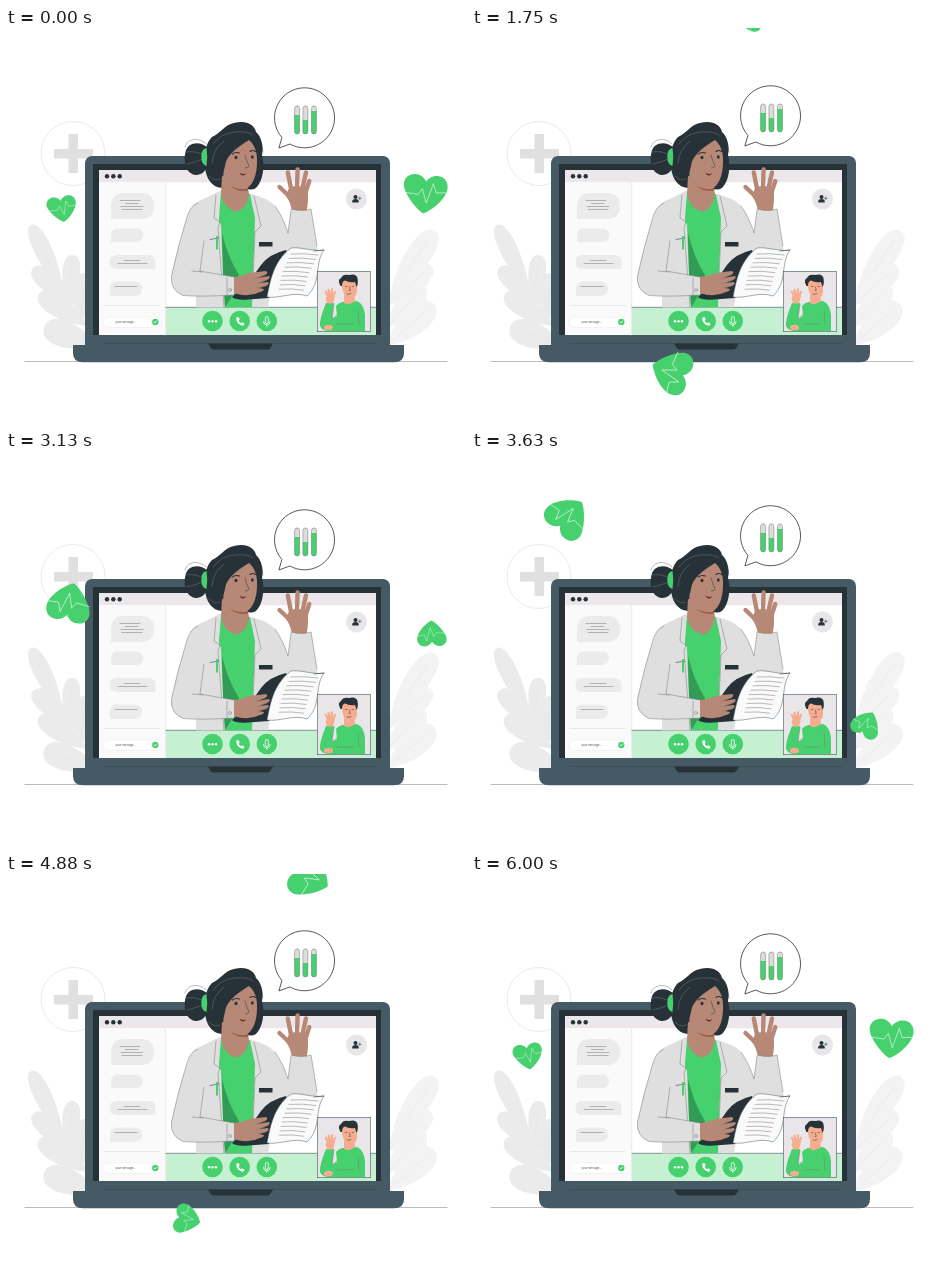
These frames come from a looping animation (460 by 395 pixels, 6040 ms). An HTML page:

```html
<!DOCTYPE html>
<html lang="en">
<head>
<meta charset="utf-8">
<title>Online doctor</title>
<style>
html, body { margin: 0; width: 100%; height: 100%; overflow: hidden; background: #fff; }
svg { display: block; width: 100vw; height: 100vh; }
#hearts { transform-origin: 240.9px 170px; }
.green { fill: #47d06e; }
.slate { fill: #455a64; }
.dark { fill: #263238; }
.soft { fill: #ebebeb; }
.coat { fill: #dfdfdf; }
.skin { fill: #b78876; }
.peach { fill: #f6ad8f; }
.white { fill: #fff; }
.line { fill: none; stroke: #37474f; stroke-width: .6; stroke-linecap: round; stroke-linejoin: round; }
.thin { stroke: #777; stroke-width: .5; }
.pale { stroke: #dcdcdc; }
.ink { stroke: #fff; stroke-width: .8; }
.bold { stroke: #263238; stroke-width: 1.1; }
.finger { fill: none; stroke: #b78876; stroke-width: 4.4; stroke-linecap: round; }
.small { fill: none; stroke: #f6ad8f; stroke-width: 2.3; stroke-linecap: round; }
</style>
</head>
<body>
<svg viewBox="0 0 460 395" preserveAspectRatio="none">
  <defs>
    <g id="heart">
      <path class="green" d="M0 19.500C-8 16-22-.5 -22-8C-22-15-17-19-11-19C-6-19-2-16 0-12.500C2-16 6-19 11-19C17-19 22-15 22-8C22 3 8 16 0 19.500Z"/>
      <path class="line ink" style="stroke-width:.55" d="M-20 0L-7 1L-3-5L2 9L7.500-11L11-2L21-3"/>
    </g>
  </defs>

  <path class="line thin" d="M19 333.500H441"/>
  <g id="plants"></g>

  <circle cx="67" cy="125.500" r="32" fill="#fff" stroke="#e0e0e0" stroke-width=".7"/>
  <path fill="#e0e0e0" d="M62.500 106h9.500v15h15v9.500h-15v14.500h-9.500v-14.500h-14.500v-9.500h14.500z"/>

  <!-- laptop -->
  <rect class="slate" x="79" y="128" width="305" height="195" rx="7"/>
  <path class="dark" d="M87 136H375V307H87Z"/>
  <path class="white" d="M93 142H370V307H93Z"/>
  <path fill="#ebe7ea" d="M93 142H370V154.300H93Z"/>
  <g class="dark"><circle cx="101" cy="148.200" r="2.200"/><circle cx="107.300" cy="148.200" r="2.200"/><circle cx="113.700" cy="148.200" r="2.200"/></g>
  <path class="slate" d="M67 317H398V325Q398 334.300 388 334.300H77Q67 334.300 67 325Z"/>
  <path class="line" d="M98 315.500H370"/>
  <path class="dark" d="M202 315.500H267L264 320.500Q263 321.500 261 321.500H208Q206 321.500 205 320.500Z"/>

  <!-- chat -->
  <path fill="#fafafa" d="M93 154.300H160V307H93Z"/>
  <path class="line pale" d="M159.700 155V307M98 277.500H153"/>
  <g class="soft">
    <path d="M105 191V177.500Q106 165 118 165H135Q148 165.500 148 178T135 191Z"/>
    <path d="M105 214V207Q105 200.500 112 200.500H130Q137 201 137 207.300T130 214Z"/>
    <path d="M149.500 241V234Q149.500 227 142 227H111Q103.500 227 103.500 234T111 241Z"/>
    <path d="M104 268V260Q104 253.500 111 253.500H128Q136 253.500 136 260.500T128 268Z"/>
  </g>
  <path class="line thin" d="M114 172.500H134M119.500 175.500H132M115 178.500H137M116 181.500H136M118 232.500H134M112 235.500H141M109 258.500H131"/>
  <rect x="97.500" y="289" width="57" height="10.500" rx="5" fill="#fff" stroke="#ececec" stroke-width=".6"/>
  <text x="109.500" y="295.200" font-family="Lato, sans-serif" font-size="3.200" font-style="italic" fill="#455a64">your message...</text>
  <circle class="green" cx="149.300" cy="294" r="3.200"/>
  <path class="line ink" d="M148 294l1 1l1.600-2"/>

  <!-- call bar -->
  <path fill="#c5f0d2" d="M160 279.500H370V307H160Z"/>
  <path class="line" d="M160 279.300H370"/>
  <g class="green"><circle cx="206.500" cy="293" r="10.300"/><circle cx="233.700" cy="293" r="10.300"/><circle cx="260.800" cy="293" r="10.300"/></g>
  <g class="white"><circle cx="203" cy="293.200" r="1.200"/><circle cx="206.500" cy="293.200" r="1.200"/><circle cx="210" cy="293.200" r="1.200"/></g>
  <path class="white" d="M230.500 289.500L232.500 289L233.700 291.500L232.600 292.700Q233.500 294.500 235 295.200L236.500 294.200L238.500 296L237.300 297.800Q235.500 298 233 296Q229.500 293 230.500 289.500Z"/>
  <path class="line ink" d="M259.300 290a1.500 1.500 0 0 1 3 0v4a1.500 1.500 0 0 1-3 0zM257.500 293.500q0 3.500 3.300 3.500t3.300-3.500M260.800 297v1.500"/>
  <circle cx="350.500" cy="171" r="10.500" fill="#e8e6e9"/>
  <g class="dark"><circle cx="349.500" cy="169" r="2"/><path d="M346.200 174.500V173Q346.500 171 349.500 171T352.700 173V174.500Z"/></g>
  <path class="line" d="M352.500 170.300h2.600m-1.300-1.300v2.600"/>

  <!-- doctor: raised arm and coat -->
  <path class="finger" d="M284 169L273.500 159M285.500 163L281.800 144.500M291 160L291.600 141.500M296 162L300 144.500M299 166L303.300 153"/>
  <path class="skin" d="M283 160Q292 155 301.500 162Q303 171 300.500 184H286Q285 175 280 168Z"/>
  <path class="coat" d="M190 176Q197 171 214 163L245 166Q262 170 269 178Q277 189 282 205L285 181Q296 184 305 181L312 225Q310 240 297 240L272 225L262 279.300H190Z"/>
  <path class="green" d="M215 164L213 190L219 279.300H246L249 190L244 166Z"/>
  <path fill="#329b56" d="M216 205Q222 230 233 247L225 270L219 279L217 245Z"/>
  <path class="coat" d="M214 163L208 169L210 191L215 196L218 279.300H190V176Z"/>
  <path class="coat" d="M244 165L252 174L256 198L249 204L246 262L265 255L268 180Z"/>
  <path class="line thin" d="M210 167L208 190L214 194L212 200L218 279M248 168L255 198L249 204L247 250M269 178Q277 189 282 205L285 182M285 181Q296 184 305 181L311 218M190 193L191 225"/>
  <path class="coat" d="M200 170Q187 174 183 184Q173 212 165.500 248Q164 262 177 267.500Q194 269 228 267V249L194 243L199 210Z"/>
  <path class="line thin" d="M192 175Q184 178 181 189Q172 218 165.500 248Q164 262 177 267.500Q194 269 228 267M194 243L228 249M194 243L198 213M186 243L197 244M221 250V267"/>
  <circle class="line thin" cx="224" cy="262" r="1.500"/>
  <path class="line" d="M204 211.500L213 210"/>
  <path class="green" d="M210 208h2v13l-1 1l-1-1z"/>
  <path class="dark" d="M253 214H266.500V218.500H253Z"/>

  <!-- head -->
  <path class="dark" d="M201 119C193 112 181 115 179.500 124C177 134 180 146 190 147C196 147 199 143 202 138Z"/>
  <path class="line thin" d="M180 124Q190 122 199 128M181 136Q190 134 199 130M179 119C181 110 194 109 200 116M249 110Q256 113 257 124"/>
  <path class="dark" d="M203 152C197 142 196 119 206 109C214 106 218 97 228 95C240 91.500 249 97 250 104C255 108 258 118 256 127C259 138 257 153 250 160Q245 163 239 160L216 160Q207 159 203 152Z"/>
  <path class="green" d="M200.500 120Q202 129 200.500 138Q195.500 137 195.300 129T200.500 120Z"/>
  <path class="skin" d="M216 148L215 165Q217 180 230 183.500Q241 181 243 166L241 154Z"/>
  <path fill="#9c5a43" d="M220 153Q229 162 242 159V162.500Q228 165 220 153Z"/>
  <path class="skin" d="M243 112C249 117 251.500 125 251 134C251 147 247 157 240 161C231 162 221 158 217 151Q217 144 219 138C220 128 230 120 243 112Z"/>
  <path class="line thin" d="M207 116Q215 105 229 104T247 107M206 135Q207 121 218 113M203 148Q209 154 214 151"/>
  <path class="line bold" d="M226.500 126Q229 123.500 233.500 125M244 123.500Q246.500 121.500 249.500 123.500"/>
  <path class="line" d="M239 127Q240.500 133 243 138Q242.500 140 239.500 140"/>
  <ellipse class="dark" cx="230" cy="129.500" rx="1.500" ry="1.700"/><ellipse class="dark" cx="246.300" cy="129" rx="1.400" ry="1.700"/>
  <path fill="#6d3226" d="M233.500 144.500Q237 147 240.500 145Q238.500 148 236.500 147.500T233.500 144.500Z"/>

  <!-- clipboard -->
  <path class="dark" d="M280 222Q263 226 255 237Q244 254 226 269Q230 272.500 242 271.500L263 270Q271 245 282 227Z"/>
  <path d="M285 220C295 218.500 307 224 318 222C308 236 316 254 301 268C288 263 273 271 261 269C264 256 266 234 285 220Z" fill="#fafafa" stroke="#455a64" stroke-width=".5"/>
  <path class="line" d="M308 223L318 222"/>
  <path id="notes" class="line thin"/>
  <path class="skin" d="M228 249Q237 248 243 245L260 243Q263 245 259 247L251 250L263 248Q265 250 261 252L253 255L262 254Q264 256 260 258L253 260L258 261Q258 263 254 264Q242 270 228 265Z"/>
  <path class="line thin" d="M249 251L259 247M251 256L261 252M251 260L260 258"/>

  <g id="hearts">
    <use href="#heart" transform="translate(56 181) rotate(-9) scale(.67)"/>
    <use href="#heart" transform="translate(419 166) rotate(5)"/>
  </g>

  <!-- patient -->
  <rect x="311.300" y="243.300" width="53" height="60.400" fill="#e8e6e9" stroke="#455a64" stroke-width=".6"/>
  <path class="green" d="M330 278Q335 273 341 274L351 273Q358 276 359 287V303H327Q316 304 314 298Q313 292 320 275L328 275L326 291L331 288Z"/>
  <path class="peach" d="M338 264L338 275Q343 278 349 273L348 264Z"/>
  <path class="peach" d="M336 253Q343 249 351 252V264Q350 270 344.500 270Q337 269 336 259Z"/>
  <path class="dark" d="M334.500 258Q331 252 335 250Q337 245.500 343 247Q350 245 351.500 250Q352.500 256 350.500 259L349 254Q343 255 339 252.500Q336 253 336 258Z"/>
  <path class="line" d="M339.500 258.500h1.500M346 258.500h1.500M343.500 259l.7 3.500h-1M341 266q2 1 4-.5"/>
  <path class="small" d="M322 268L319.800 264M323.500 267L322.500 262M325.500 267L326 261.500M327 268L329 264"/>
  <path class="peach" d="M321 267Q325 264 329 268L327 275.500H321.500L319.500 271Z"/>
  <ellipse class="peach" cx="322.500" cy="299.500" rx="4.500" ry="2.700"/>
  <path class="line thin" d="M328 276L326 291L331 287M331 296H348M352 283L353 296"/>

  <!-- speech bubble -->
  <g id="bubble">
    <path d="M275 108.500A30 30 0 1 1 283 115L272 119Z" fill="#fff" stroke="#263238" stroke-width=".8"/>
    <g id="tubes"></g>
  </g>
</svg>
<script>
const byId = id => document.getElementById(id);

// Leaf from base to tip, w wide, with a faint vein.
function leaf([x0, y0, x1, y1, w, fill]) {
  const dx = x1 - x0, dy = y1 - y0, len = Math.hypot(dx, dy);
  const nx = -dy / len * w * .65, ny = dx / len * w * .65;
  const side = s => `${x0 + dx * .45 + s * nx} ${y0 + dy * .45 + s * ny} ` +
    `${x1 + s * nx} ${y1 + s * ny}`;
  return `<path fill="${fill}" d="M${x0} ${y0}C${side(1)} ${x1} ${y1}` +
    `C${x1 - nx} ${y1 - ny} ${x0 + dx * .45 - nx} ${y0 + dy * .45 - ny} ${x0} ${y0}Z"/>` +
    `<path d="M${x0} ${y0}L${x1 - dx * .15} ${y1 - dy * .15}" stroke="#e3e3e3" stroke-width=".5"/>`;
}
const grey = '#ebebeb', light = '#f3f3f3';
byId('plants').innerHTML = [
  [58, 265, 25, 197, 18, grey], [62, 272, 67, 227, 18, grey],
  [72, 278, 27, 240, 21, grey], [82, 298, 33, 266, 22, grey],
  [92, 318, 38, 299, 27, grey], [74, 295, 80, 245, 24, grey],
  [384, 268, 429, 203, 25, light], [380, 278, 425, 238, 23, light],
  [380, 318, 428, 276, 27, light], [380, 300, 418, 258, 24, light]
].map(leaf).join('');

byId('notes').setAttribute('d', Array.from({ length: 9 }, (_, i) => {
  const x = 285 - i * 2 + (i > 4 ? i - 4 : 0), y = 226 + i * 4.400;
  return `M${x} ${y}q13-1 ${27 - i * .3} 1`;
}).join(''));

byId('tubes').innerHTML = [[287.700, 86], [296, 91], [304.500, 82]].map(([x, level]) =>
  `<rect x="${x}" y="77" width="5" height="28" rx="2.500" fill="#dcdcdc"/>
   <path class="green" d="M${x} ${level}h5V102.500a2.500 2.500 0 0 1-5 0Z"/>
   <rect class="line thin" x="${x}" y="77" width="5" height="28" rx="2.500"/>`).join('');

// The picture advances 24 times a second; the bubble bobs in 1.5 s.
const LOOP = 6040, FRAMES = 145, STEP = 1000 / 24, SPIN = 2.497, RISE = 6.1;

function draw(now) {
  const n = Math.min(FRAMES - 1, Math.floor((now % LOOP + 4.900) / STEP));
  const phase = n * STEP / 1500 % 1;
  const lift = RISE * (1 - Math.abs(1 - 2 * phase));
  byId('hearts').style.transform = `rotate(${n * SPIN}deg)`;
  byId('bubble').setAttribute('transform', `translate(.9 ${1 - lift})`);
}

const start = performance.now();
function tick() {
  draw(Math.max(0, performance.now() - start));
  requestAnimationFrame(tick);
}
tick();
</script>
</body>
</html>
```
